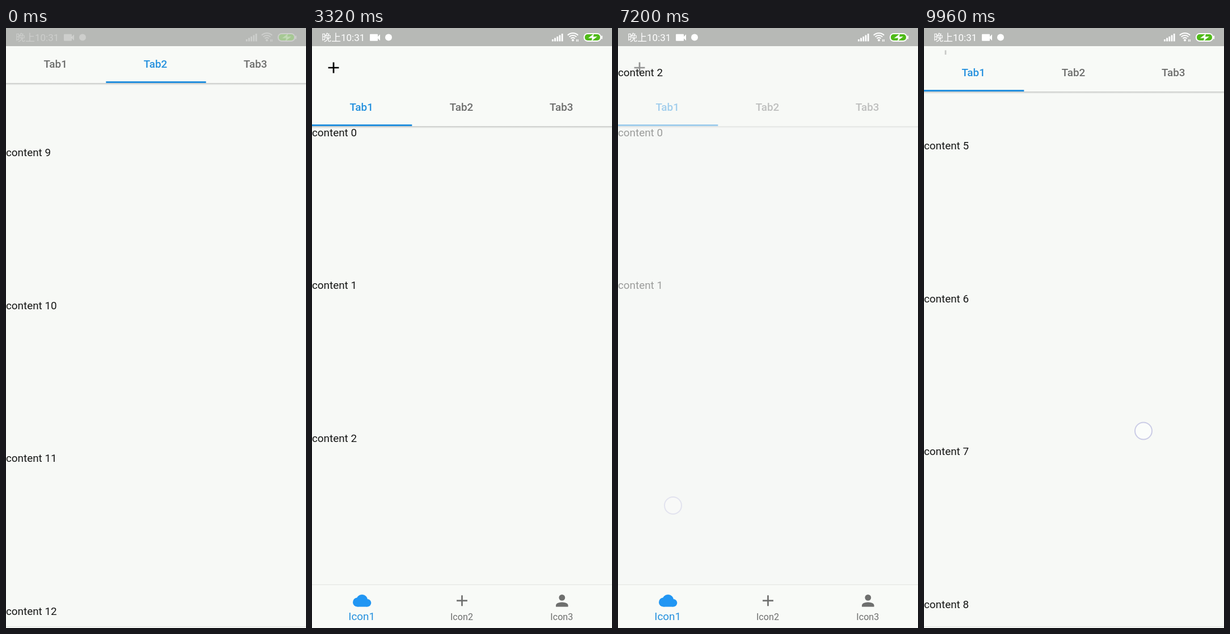
An HTML page with a canvas for the animation above (10000 ms loop, 529 by 1058 pixels).

```html
<!DOCTYPE html>
<html>
<head>
<meta charset="utf-8">
<style>
html, body { margin: 0; width: 529px; height: 1058px; overflow: hidden; background: #f7f9f6; }
canvas { display: block; }
</style>
</head>
<body>
<canvas id="stage" width="529" height="1058"></canvas>
<script>
const ctx = document.getElementById('stage').getContext('2d');
const W = 529, H = 1058, LOOP = 10000;
const DP = 1.347, TAB = W / 3, TOOLBAR = 75.4, STATUS = 32, ROW = 269.6;
const LIST_TOP = 184, PAGE_TOP = 43.5;
const DRAG = 240, FLING = 500, PAGE = 300, SWIPE = 2750;
const BG = '#f7f9f6', BAR = '#f8faf7', BLUE = [36, 144, 222], GRAY = [108, 109, 108];
const ICON_BLUE = '#2196f3', ICON_GRAY = '#6e6f6e';

// Vertical drags: finger travel dy, then a fling in the list of one tab
const drags = [
  { tab: 1, start: 160, x: 400, y: 420, dy: 347, fling: 457.5 },
  { tab: 1, start: 1100, x: 428, y: 723, dy: -347, fling: -500 },
  { tab: 1, start: 1840, x: 390, y: 690, dy: 80 },
  { tab: 0, start: 7760, x: 420, y: 760, dy: -416, fling: -928 },
  { tab: 0, start: 8760, x: 406, y: 691, dy: 80, hold: 720 },
  { tab: 0, start: 9720, x: 406, y: 771, dx: -19, dy: -60.5 }
];
const details = [{ n: 1, push: 4480, pop: 5240 }, { n: 2, push: 6040, pop: 7110 }];
const rowY = n => LIST_TOP + n * ROW;

// Every finger contact: the drags, the tab swipe, and tap and edge swipe of each detail page
const touches = [
  ...drags,
  { start: SWIPE, x: 130, y: 620, dx: 270 },
  ...details.flatMap(d => [
    { start: d.push - DRAG, x: 100, y: rowY(d.n) + 110 },
    { start: d.pop - 210, x: 4, y: 842, dx: 93 }
  ])
];

const clamp = (v, max = 1) => Math.max(0, Math.min(max, v));
const easeOut = u => 1 - (1 - u) ** 2.5;
const moved = (d, t) => d.dy * clamp((t - d.start) / DRAG)
  + (d.fling || 0) * easeOut(clamp((t - d.start - DRAG) / FLING));

const scroll = (tab, from, t) =>
  drags.reduce((y, d) => d.tab === tab ? y + moved(d, t) : y, from);

// Both bars follow the drags, starting hidden
const collapse = t => drags.reduce((c, d) => clamp(c - moved(d, t), TOOLBAR), TOOLBAR);
const navHide = t => drags.reduce((h, d) => clamp(h - Math.sign(d.dy) * clamp((t - d.start) / 200)), 1);

const openness = (d, t) => Math.min(clamp((t - d.push) / PAGE), clamp(1 - (t - d.pop) / PAGE));

function text(str, x, base, size, color, align = 'left', weight = 400) {
  ctx.font = `${weight} ${size}px Roboto, "Noto Sans CJK SC", "Noto Sans CJK", sans-serif`;
  ctx.textAlign = align;
  ctx.fillStyle = color;
  ctx.fillText(str, x, base);
}

function rect(x, y, w, h, color, r = 0) {
  ctx.fillStyle = color;
  ctx.beginPath();
  ctx.roundRect(x, y, w, h, r);
  ctx.fill();
}

function disc(x, y, r, color) {
  ctx.fillStyle = color;
  ctx.beginPath();
  ctx.arc(x, y, r, 0, 7);
  ctx.fill();
}

function polygon(points, color) {
  ctx.fillStyle = color;
  ctx.beginPath();
  points.forEach(p => ctx.lineTo(...p));
  ctx.fill();
}

// Icons on a 24-unit grid
const icons = {
  add(color) {
    rect(5, 11, 14, 2, color);
    rect(11, 5, 2, 14, color);
  },
  cloud(color) {
    disc(6, 14, 6, color);
    disc(12, 11.5, 7.5, color);
    disc(19, 15, 5, color);
    rect(6, 12, 13, 8, color);
  },
  person(color) {
    disc(12, 8, 4, color);
    ctx.beginPath();
    ctx.ellipse(12, 18, 8, 4, 0, Math.PI, 0);
    ctx.fill();
    rect(4, 17.9, 16, 2.1, color);
  },
  video(color) {
    rect(3, 6, 14, 12, color, 1);
    polygon([[16, 11.5], [21, 6.5], [21, 17.5], [16, 12.5]], color);
  }
};

function icon(name, cx, cy, scale, color) {
  ctx.save();
  ctx.translate(cx, cy);
  ctx.scale(scale, scale);
  ctx.translate(-12, -12);
  icons[name](color);
  ctx.restore();
}

const content = (n, x, y) => text('content ' + n, x, y + 6.7, 14 * DP, '#151615');

function list(x, top, hidden) {
  if (Math.abs(x) >= W) return;
  const first = Math.max(0, Math.floor(-top / ROW));
  for (let n = first; n < first + 6; n++) if (n !== hidden) content(n, x, top + n * ROW);
}

function header(c, pos) {
  const bottom = Math.round(172.5 - c);
  const shade = ctx.createLinearGradient(0, bottom, 0, bottom + 4);
  shade.addColorStop(0, 'rgba(0,0,0,.2)');
  shade.addColorStop(1, 'rgba(0,0,0,0)');
  rect(0, bottom, W, 4, shade);
  rect(0, STATUS, W, bottom - STATUS, BAR);

  // The plus stays below its padding while the toolbar clips it
  ctx.save();
  ctx.beginPath();
  ctx.rect(0, STATUS, W, TOOLBAR - c);
  ctx.clip();
  ctx.globalAlpha = 1 - c / TOOLBAR;
  icon('add', 38, Math.max(48.7, 70 - c / 2), DP, '#000');
  ctx.restore();

  for (let i = 0; i < 3; i++) {
    const on = clamp(1 - Math.abs(pos - i));
    const rgb = GRAY.map((g, j) => g + (BLUE[j] - g) * on);
    text('Tab' + (i + 1), TAB * (i + .5) - 1, 145.7 - c, 14 * DP, `rgb(${rgb})`, 'center', 500);
  }
  rect(pos * TAB, bottom - 3, TAB, 3, `rgb(${BLUE})`);
}

// The tapped row flies to the top while the page fades in
function detail(n, open) {
  ctx.globalAlpha = open ** 1.45;
  rect(0, STATUS, W, H, BG);
  ctx.globalAlpha = 1;
  content(n, 0, PAGE_TOP + (rowY(n) - PAGE_TOP) * (1 - easeOut(open)));
}

function navBar(hide) {
  ctx.save();
  ctx.translate(0, hide * 74);
  rect(0, 981, W, 80, BAR);
  rect(0, 981, W, 1.3, '#e5e7e4');
  ['cloud', 'add', 'person'].forEach((name, i) => {
    const cx = TAB * (i + .5), active = i === 0;
    icon(name, cx, 1009.8, DP, active ? ICON_BLUE : ICON_GRAY);
    text('Icon' + (i + 1), cx - .5, 1044, (active ? 14 : 12) * DP,
      active ? `rgb(${BLUE})` : ICON_GRAY, 'center');
  });
  ctx.restore();
}

function statusBar(alpha) {
  rect(0, 0, W, STATUS, '#b7b9b6');
  ctx.globalAlpha = alpha;
  text('晚上10:31', 17, 23.3, 17, '#fff');
  icon('video', 111, 16.7, 1, '#fff');
  disc(135, 16.5, 6, '#fff');

  for (let i = 0; i < 5; i++) rect(423 + i * 4.2, 20 - i * 2.5, 2.8, 3.5 + i * 2.5, '#fff');

  ctx.strokeStyle = '#fff';
  ctx.lineWidth = 2;
  for (let r = 5; r < 14; r += 4) {
    ctx.beginPath();
    ctx.arc(460, 22, r, -Math.PI * .75, -Math.PI * .25);
    ctx.stroke();
  }
  disc(460, 21.5, 2, '#fff');
  rect(466, 20, 1.3, 4, '#fff');
  rect(468.5, 20, 1.3, 4, '#fff');

  rect(479, 9, 31, 15, '#fff', 7);
  rect(510, 13.5, 2.2, 6, '#fff', 1);
  rect(481, 11, 27, 11, '#4fba18', 5);
  polygon([[487, 18], [497, 10], [496, 15.5], [503, 15], [493, 23], [494, 17.5]], '#fff');
  ctx.globalAlpha = 1;
}

function touch({ start, x, y, dx = 0, dy = 0, hold = 0 }, t) {
  const end = start + DRAG + hold;
  const alpha = Math.min(clamp((t - start + 100) / 60), clamp((end + 120 - t) / 120));
  if (!alpha) return;
  const u = clamp((t - start) / DRAG);
  ctx.globalAlpha = alpha;
  disc(x + dx * u, y + dy * u, 15, 'rgba(252,253,252,.75)');
  ctx.strokeStyle = '#cbcce6';
  ctx.lineWidth = 2;
  ctx.stroke();
  ctx.globalAlpha = 1;
}

function draw(t) {
  const pos = 1 - easeOut(clamp((t - SWIPE) / 570));
  const page = details.find(d => openness(d, t) > 0);
  rect(0, 0, W, H, BG);
  list(-pos * W, scroll(0, LIST_TOP, t), page && page.n);
  list((1 - pos) * W, scroll(1, -2207, t));
  header(collapse(t), pos);
  if (page) detail(page.n, openness(page, t));
  navBar(navHide(t));
  statusBar(clamp(.3 + t / 230));
  touches.forEach(p => touch(p, t));
}

const begin = performance.now();
function frame() {
  draw((performance.now() - begin) % LOOP);
  requestAnimationFrame(frame);
}
frame();
</script>
</body>
</html>
```
